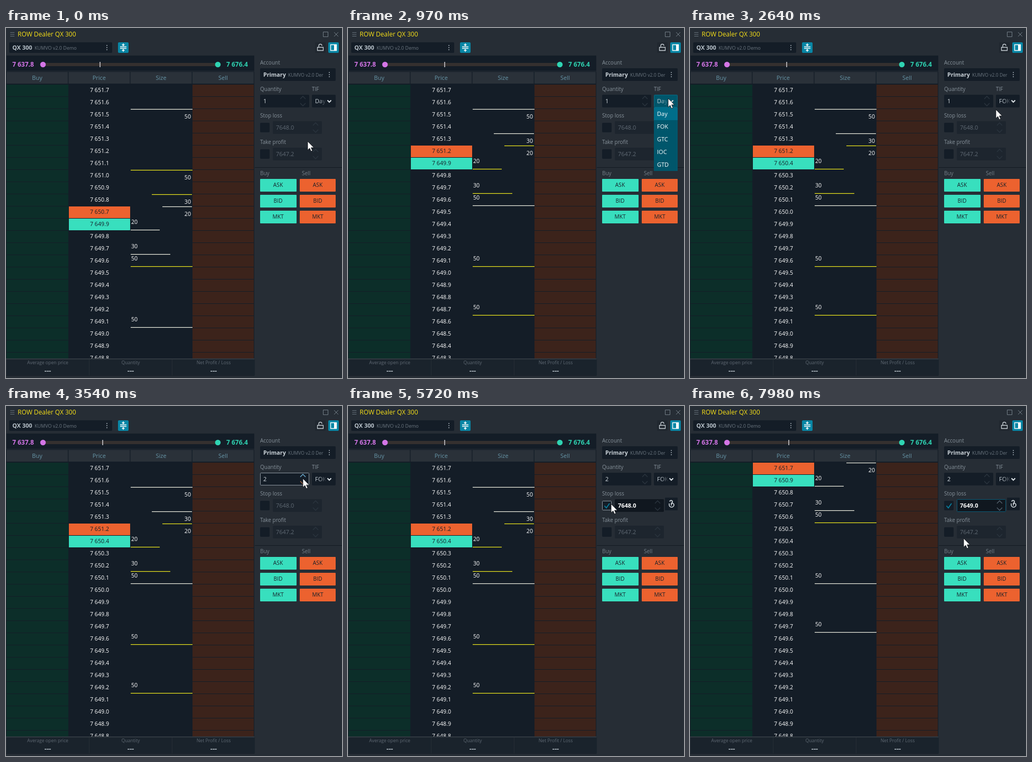
Animation of 636x661 px, one loop 8 s. Source, as an HTML page:

```html
<!DOCTYPE html>
<html lang="en">
<head>
<meta charset="utf-8">
<title>Order ladder</title>
<style>
  html, body { margin: 0; width: 100%; height: 100%; overflow: hidden; background: #262d35; }
  svg { display: block; width: 636px; height: 661px; font-family: "Open Sans", "Noto Sans", sans-serif; }
  text { white-space: pre; }
</style>
</head>
<body>
<script>
const LOOP = 8000, ROWS = 23, ROW_H = 23, TOP = 107;
const C = {
  panel: '#262d35', dark: '#141d27', dim: '#1d252e', label: '#87929b', faint: '#5f6973',
  light: '#b9c3cb', white: '#fff', teal: '#38dfbe', orange: '#ec622f', blue: '#0886a5',
  menu: '#00566b', menuHot: '#006e8a', edge: '#8b959e', yellow: '#f0ea1c', off: '#2b353f'
};

function node(tag, attrs, parent) {
  const n = document.createElementNS('http://www.w3.org/2000/svg', tag);
  set(n, attrs);
  parent.appendChild(n);
  return n;
}
function set(n, attrs) {
  for (const k in attrs) if (n.getAttribute(k) !== String(attrs[k])) n.setAttribute(k, attrs[k]);
}
const svg = node('svg', { viewBox: '0 0 636 661' }, document.body);
const group = (parent = svg, attrs = {}) => node('g', attrs, parent);
const rect = (x, y, width, height, fill, parent = svg, extra = {}) =>
  node('rect', { x, y, width, height, fill, ...extra }, parent);
const path = (d, stroke, width = 1, parent = svg, extra = {}) =>
  node('path', { d, stroke, 'stroke-width': width, fill: 'none', ...extra }, parent);
function text(s, x, y, size, fill, parent = svg, extra = {}) {
  const n = node('text', { x, y, 'font-size': size, fill, ...extra }, parent);
  n.textContent = s;
  return n;
}
const BOLD = { 'font-weight': 700 }, MID = { 'text-anchor': 'middle' }, END = { 'text-anchor': 'end' };
const show = (n, on) => set(n, { visibility: on ? 'visible' : 'hidden' });
const say = (n, s) => { if (n.textContent !== s) n.textContent = s; };
const dots = x => y => [-4, 0, 4].forEach(d => rect(x - 1, y + d - 1, 2, 2, '#7d8790'));

const defs = node('defs', {}, svg);
const fade = node('linearGradient', { id: 'fade' }, defs);
const fadeStops = [0, 1].map(o => node('stop', { offset: o, 'stop-opacity': o, 'stop-color': C.dark }, fade));
const clip = node('clipPath', { id: 'ladder' }, defs);
rect(0, 106, 470, 518, '#000', clip);

// Window frame and toolbar
rect(0, 0, 636, 661, C.panel);
path('M8 8.5h8M8 12h8M8 15.5h8', '#66717b');
text('ROW Dealer QX 300', 22, 16, 12, '#f7e018');
path('M600.5 7.5h9v9h-9z M621 8l8 8m0-8l-8 8', '#727d86');
rect(6, 27, 195, 20, C.dark, svg, { rx: 2 });
text('QX 300', 12, 41, 11, C.light, svg, BOLD);
text('KUMVO v2.0 Demo', 54, 41, 9, '#6c7780');
dots(191)(37);
rect(212, 27, 20, 20, C.blue, svg, { rx: 2 });
path('M216 35.5h12M216 38.5h12M222 29v4M222 41v4', C.white, 1.3);
node('path', { d: 'M219 31h6l-3 3.5zM219 43h6l-3-3.5z', fill: C.white }, svg);
rect(585, 27, 20, 20, '#20272f', svg, { rx: 2 });
path('M589.5 36.5h11v6h-11zM592 36v-2.5a3 3 0 0 1 6 0', '#c5cdd3', 1.3);
rect(610, 27, 20, 20, C.blue, svg, { rx: 2 });
path('M614.5 31.5h11v11h-11z', C.white, 1.4);
rect(621, 31, 5, 12, C.white);

// Price range
rect(1, 52, 469, 29, C.dark);
rect(66, 66, 339, 6, '#35302f', svg, { rx: 3 });
const marker = rect(177, 64, 2, 10, '#aaa8ab');
node('circle', { cx: 70, cy: 69, r: 5.3, fill: '#d375e6' }, svg);
node('circle', { cx: 401, cy: 69, r: 5.3, fill: '#2fd3b2' }, svg);
text('7 637.8', 12, 73, 12, '#d375e6', svg, BOLD);
text('7 676.4', 417, 73, 12, '#2fd3b2', svg, BOLD);

// Ladder columns
rect(0, 82, 470, 543, C.dark);
['Buy', 'Price', 'Size', 'Sell'].forEach((name, i) => {
  rect(1 + i * 117.3, 83, 116, 22, '#2a3139');
  text(name, 59 + i * 117.3, 98, 11, '#6796a8', svg, MID);
});
const ladder = group(svg, { 'clip-path': 'url(#ladder)' });
const prices = [];
const askBar = rect(119, 0, 116, 22, C.orange, ladder);
const bidBar = rect(119, 0, 116, 22, C.teal, ladder);
for (let r = 0; r < ROWS; r++) {
  const y = TOP + r * ROW_H;
  rect(1, y, 117, 22, '#0c2e29', ladder);
  rect(353, y, 116, 22, '#3c231b', ladder);
  prices.push(text('', 177, y + 14, 10.7, C.white, ladder, MID));
}
const yellowRows = [220, 222, 266, 268, 312, 314, 450, 542];
const sizeWidth = { 20: 56, 30: 76, 50: 117 };
const sizeMark = (side, offset, size) => ({
  side, offset, size,
  bar: rect(0, 0, sizeWidth[size] - (side > 0 && size < 50 ? 1 : 0), 1.2, C.white, ladder),
  tag: text(size, side > 0 ? 237 : 350, 0, 10.7, C.white, ladder, side > 0 ? {} : END)
});
const sizes = [
  ...[[0, 20], [1, 30], [3, 50], [8, 50]].map(([o, s]) => sizeMark(-1, o, s)),
  ...[[0, 20], [2, 30], [3, 50], [8, 50], [12, 50]].map(([o, s]) => sizeMark(1, o, s))
];

// Footer
rect(0, 624, 470, 2, '#303840');
['Average open price', 'Quantity', 'Net Profit / Loss'].forEach((name, i) => {
  rect(1 + i * 157, 626, 156, 30, '#1a232c');
  text(name, 79 + i * 157, 635, 8.7, C.faint, svg, MID);
  text('---', 79 + i * 157, 652, 13, C.light, svg, { ...MID, ...BOLD });
});
rect(0, 656, 470, 1, '#1a2129');

// Order form
const field = (x, y, w, h, fill = C.dark) =>
  rect(x + .5, y + .5, w - 1, h - 1, fill, svg, { rx: 1, stroke: fill });
function spinner(x, y) {
  return [path(`M${x - 5} ${y - 4}l5-5 5 5`, C.off, 1.3), path(`M${x - 5} ${y + 4}l5 5 5-5`, C.off, 1.3)];
}
text('Account', 481, 69, 10, C.label);
field(481, 76, 143, 24);
text('Primary', 487, 92, 10.7, '#c9d1d7', svg, BOLD);
text('KUMVO v2.0 Der', 534, 92, 8.6, '#6c7780');
dots(612)(88);
text('Quantity', 481, 119, 10, C.label);
text('TIF', 579, 119, 10, C.label);
const qtyBox = field(481, 126, 93, 24);
const qty = text('1', 487, 142, 11, '#d5dce1');
const qtySpin = spinner(562, 138);
const tifBox = field(579, 126, 45, 24);
const tif = text('Day', 585, 142, 11, '#c2cbd1');
rect(593, 130, 14, 17, 'url(#fade)');
path('M608.5 136.5l3.5 3.5 3.5-3.5', '#dbe2e6', 2);

text('Stop loss', 481, 169, 10, C.label);
const check = field(481, 179, 18, 18);
const tick = path('M485.5 188.5l3.5 4 6-8.5', '#087f9f', 1.8);
const stopBox = field(505, 176, 93, 24, C.dim);
const selection = rect(529.5, 181, 7, 14, '#1d78d0');
const stop = text('7648.0', 511, 192, 11, C.faint);
const caret = rect(536.5, 181, 1, 14, C.white);
const stopSpin = spinner(586, 188);
const hook = group();
rect(600, 173, 24, 24, C.dark, hook, { rx: 1 });
path('M609 180.5a2.6 2.6 0 1 1 3 3v4.5M608 184v2.5a4.5 4.5 0 0 0 9 0a3 3 0 0 0-5-2', '#cfd6db', 1.6, hook);

text('Take profit', 481, 219, 10, C.label);
field(481, 229, 18, 18);
field(505, 226, 93, 24, C.dim);
text('7647.2', 511, 242, 11, C.faint);
spinner(586, 238);
rect(471, 263, 165, 1, '#141b22');
text('Buy', 481, 278, 10, '#76818a');
text('Sell', 560, 278, 10, '#76818a');
['ASK', 'BID', 'MKT'].forEach((name, i) => {
  const y = 285 + i * 30;
  rect(481, y, 69, 24, C.teal, svg, { rx: 1 });
  rect(556, y, 68, 24, C.orange, svg, { rx: 1 });
  [515, 590].forEach(x => text(name, x, y + 15, 10.2, '#18222b', svg, MID));
});

// Drop-down list
const menu = group();
rect(579, 150, 45, 120, C.menu, menu);
const menuHot = rect(579, 150, 45, 24, C.menuHot, menu);
['Day', 'FOK', 'GTC', 'IOC', 'GTD'].forEach((s, i) => text(s, 585, 166 + i * 24, 11, C.white, menu));

// Pointers
const arrow = node('path', {
  d: 'M0 0V16.5L3.8 13 6.4 19 9 17.8 6.5 12H11.8Z', fill: C.white, stroke: '#0b0f14', 'stroke-width': .8
}, svg);
const beam = path('M-3-7.5h2.2L0-6.8.8-7.5H3M0-7V7M-3 7.5h2.2L0 6.8.8 7.5H3', '#e8ecef', 1.2);

// Time, then pointer x and y
const track = [
  [0, 571, 214], [50, 571, 214], [460, 606, 133], [1480, 606, 133], [1760, 606, 182],
  [2260, 606, 182], [2920, 562, 137], [3540, 562, 137], [4090, 498, 185], [5720, 498, 185],
  [6400, 539, 188], [6570, 539, 188], [6780, 532, 188], [7860, 532, 188], [7980, 518, 250], [8000, 518, 250]
];
// Time, ask row, bid in tenths, marker position
const quotes = [
  [0, 10, 76499, 178], [850, 5, 76499, 183], [1220, 5, 76504, 183],
  [7240, 0, 76504, 187], [7660, 0, 76509, 187]
];

function pointerAt(t) {
  const i = Math.max(1, track.findIndex(k => k[0] > t));
  const [t0, x0, y0] = track[i - 1], [t1, x1, y1] = track[i];
  const p = (t - t0) / (t1 - t0), e = p * p * (3 - 2 * p);
  return [x0 + (x1 - x0) * e, y0 + (y1 - y0) * e];
}
function format(tenths) {
  const s = String(tenths);
  return `${s[0]} ${s.slice(1, 4)}.${s[4]}`;
}
let quoteShown;
function drawLadder(quote) {
  if (quote === quoteShown) return;
  quoteShown = quote;
  const [, ask, bid, mark] = quote;
  set(marker, { x: mark - 1 });
  set(askBar, { y: TOP + ask * ROW_H });
  set(bidBar, { y: TOP + (ask + 1) * ROW_H });
  prices.forEach((n, r) => {
    say(n, format(r <= ask ? 76517 - r : bid - (r - ask - 1)));
    set(n, { fill: r === ask || r === ask + 1 ? C.dark : C.white });
  });
  for (const { side, offset, size, bar, tag } of sizes) {
    const row = side > 0 ? ask + 1 + offset : ask - offset;
    const y = TOP + row * ROW_H, lineY = side > 0 ? y + 21 : y;
    set(bar, {
      x: side > 0 ? 236 : 352 - Math.min(116, sizeWidth[size]), y: lineY - .1,
      fill: yellowRows.includes(lineY) ? C.yellow : '#f3f3e4'
    });
    set(tag, { y: y + (side > 0 ? 10 : 18) - .3 });
  }
}
function paintSpin([up, down], hot, on) {
  set(up, { stroke: hot ? '#70b2d8' : on ? '#56636f' : C.off });
  set(down, { stroke: hot ? '#a3643f' : on ? '#56636f' : C.off });
}

function render(t) {
  const [x, y] = pointerAt(t);
  const over = (l, top, w, h) => x >= l && x < l + w && y >= top && y < top + h;
  drawLadder(quotes.filter(q => q[0] <= t).pop());

  const open = t >= 800 && t < 2260;
  const tifHot = over(579, 126, 45, 24) && !open;
  const tifFill = open ? C.menu : C.dark;
  show(menu, open);
  set(menuHot, { y: y >= 174 ? 174 : 150, visibility: open && (y >= 150 || t < 1480) ? 'visible' : 'hidden' });
  set(tifBox, { fill: tifFill, stroke: tifHot ? C.edge : open ? '#086a82' : C.dark });
  fadeStops.forEach(s => set(s, { 'stop-color': tifFill }));
  say(tif, t < 2260 ? 'Day' : 'FOK');

  const qtyHot = over(481, 126, 93, 24);
  set(qtyBox, { stroke: qtyHot ? C.edge : C.dark });
  paintSpin(qtySpin, qtyHot, false);
  say(qty, t < 3120 ? '1' : '2');

  const active = t >= 4600, focus = t >= 6570;
  const stopHot = active && over(505, 176, 93, 24);
  set(check, { stroke: over(481, 179, 18, 18) ? C.edge : C.dark });
  show(tick, active);
  show(hook, active);
  set(stopBox, {
    fill: active ? '#10171f' : C.dim,
    stroke: focus ? '#0b5a76' : stopHot ? C.edge : active ? '#10171f' : C.dim
  });
  set(stop, { fill: active ? C.white : C.faint, 'font-weight': active ? 700 : 400 });
  say(stop, t < 7240 ? '7648.0' : '7649.0');
  show(selection, t >= 6700 && t < 7240);
  show(caret, t >= 7240 && t < 7710);
  paintSpin(stopSpin, stopHot, focus);

  show(arrow, !stopHot);
  show(beam, stopHot);
  set(stopHot ? beam : arrow, { transform: `translate(${Math.round(x)} ${Math.round(y)})` });
}

function tick_() {
  render(performance.now() % LOOP);
  requestAnimationFrame(tick_);
}
tick_();
</script>
</body>
</html>
```
